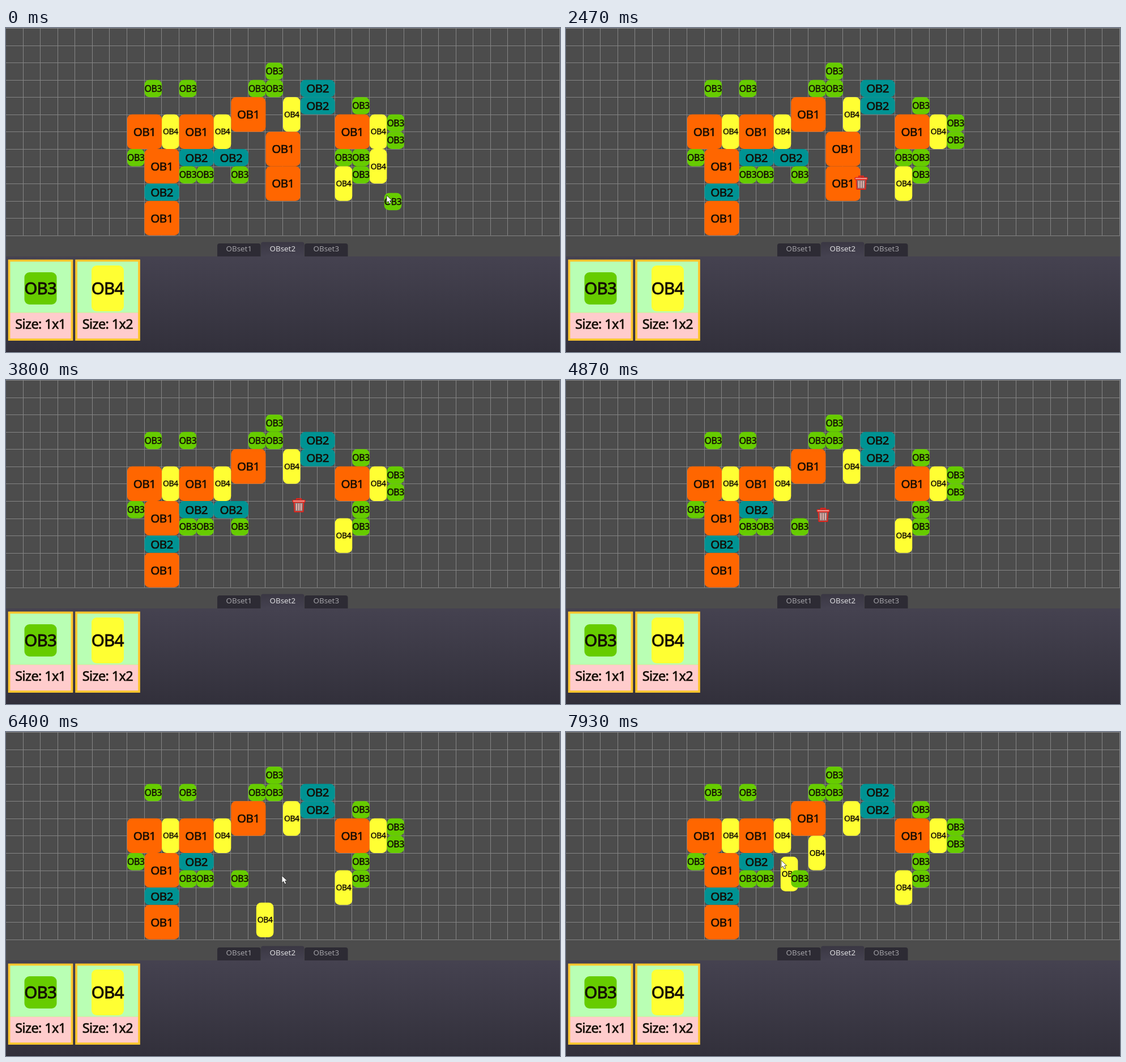
An HTML page that plays this animation: 978x573 px, repeating every 8 s.

```html
<!DOCTYPE html>
<html lang="en">
<head>
<meta charset="utf-8">
<title>Grid object editor</title>
<style>
  html, body { margin: 0; width: 100%; height: 100%; overflow: hidden; background: #4c4c4c; }
  svg { display: block; width: 978px; height: 573px; }
  text { font-family: "Noto Sans", "Open Sans", sans-serif; text-anchor: middle; fill: #140d05; }
  .label { stroke: #140d05; stroke-width: .03em; letter-spacing: -.025em; }
  .tab { font-size: 13.4px; fill: #a2a1a6; }
  .tab.active { fill: #dddde0; }
</style>
</head>
<body>
<svg viewBox="0 0 978 573">
  <defs>
    <linearGradient id="panelFill" x1="0" y1="0" x2="0" y2="1">
      <stop offset="0" stop-color="#454250"/>
      <stop offset="1" stop-color="#32303b"/>
    </linearGradient>
    <linearGradient id="tabFill" x1="0" y1="0" x2="0" y2="1">
      <stop offset="0" stop-color="#3a3743"/>
      <stop offset="1" stop-color="#454250"/>
    </linearGradient>
  </defs>
  <rect width="978" height="573" fill="#4c4c4c"/>
  <path id="grid" stroke="#858585" fill="none"/>
  <g id="ghosts"></g>
  <g id="blocks"></g>
  <g id="panel">
    <rect y="404" width="978" height="169" fill="url(#panelFill)"/>
    <path d="M0 572.5H978" stroke="#27252e"/>
  </g>
  <g id="trash">
    <path d="M3.5 8H20.5L19.5 25H4.5Z" fill="#8c7775" stroke="#e3231b" stroke-width="2" stroke-linejoin="round"/>
    <path d="M8 10.5V22.5M12 10.5V22.5M16 10.5V22.5" stroke="#f0b9b3" stroke-width="1.8"/>
    <path d="M8 4.5V2H16V4.5" fill="none" stroke="#e3231b" stroke-width="1.8"/>
    <rect x="1.2" y="4.5" width="21.6" height="3.4" rx="1" fill="#eda49d" stroke="#e3231b" stroke-width="1.5"/>
  </g>
  <path id="arrow" d="M0 0V13L3 10.2L5.2 15L7.7 14L5.6 9.3H9.6Z" fill="#fff" stroke="#222" stroke-width=".8"/>
</svg>
<script>
const NS = "http://www.w3.org/2000/svg";
const COLS = 32, ROWS = 12, CELL = 978 / COLS;
const TICK = 200 / 3, LOOP = 8000;
const byId = id => document.getElementById(id);

const KINDS = {
  OB1: { w: 2, h: 2, fill: "#ff6600", size: 20.6 },
  OB2: { w: 2, h: 1, fill: "#009393", size: 20.6 },
  OB3: { w: 1, h: 1, fill: "#66cc00", size: 15.8 },
  OB4: { w: 1, h: 2, fill: "#ffff33", size: 13.9 }
};

// Each digit is the top left cell of a block of that kind.
const MAP_COL = 7, MAP_ROW = 2;
const MAP = [
  "........3",
  ".3.3...33.2",
  "......1..42..3",
  "1.41.4......1.43",
  "........1......3",
  "31.2.2......334",
  "...33.3.1...43",
  ".2",
  ".1"
];

// Pointer moves: first tick, last tick, end point. It rests in between.
const START = [672, 296];
const MOVES = [
  [0, 7, 694, 274], [15, 22, 660, 252], [27, 32, 606, 301], [32, 37, 509, 260],
  [39, 45, 592, 226], [47, 53, 505, 208], [58, 60, 455, 248], [60, 62, 394, 224],
  [64, 67, 416, 221], [71, 73, 442, 225], [73, 80, 484, 164], [81, 91, 205, 422],
  [94, 95, 341, 440], [95, 96, 487, 254], [98, 106, 458, 194], [106, 110, 436, 189],
  [114, 119, 380, 227]
];
const ERASE_FROM = 12, ERASE_TO = 94;
const ERASE_CLICKS = [26, 39, 47, 57, 70], PLACE_CLICK = 114;
const GHOST_LAG = 0.28, GHOST_SHIFT = -4.3;

function pointer(tick) {
  let [x, y] = START;
  for (const [from, to, endX, endY] of MOVES) {
    if (tick <= from) break;
    const part = Math.min(1, (tick - from) / (to - from));
    x += (endX - x) * part;
    y += (endY - y) * part;
  }
  return [x, y];
}

const ghostAt = tick => pointer(tick - GHOST_LAG).map(v => v + GHOST_SHIFT);

function add(parent, tag, attrs, text) {
  const node = document.createElementNS(NS, tag);
  for (const key in attrs) node.setAttribute(key, attrs[key]);
  if (text) node.textContent = text;
  parent.append(node);
  return node;
}

function label(parent, text, x, middle, size) {
  add(parent, "text", { x, y: middle + size * 0.36, "font-size": size, class: "label" }, text);
}

function drawBlock(parent, kind, x = 0, y = 0) {
  const { w, h, fill, size } = KINDS[kind];
  const node = add(parent, "g", { transform: `translate(${x} ${y})` });
  add(node, "rect", { width: w * CELL, height: h * CELL, rx: 8.5, fill });
  label(node, kind, w * CELL / 2, h * CELL / 2, size);
  return node;
}

const blocks = [];
function addBlock(kind, col, row, from = 0) {
  const node = drawBlock(byId("blocks"), kind, col * CELL, row * CELL);
  blocks.push({ node, kind, col, row, from, to: Infinity });
}

function blockUnder([x, y]) {
  const inside = (cell, first, count) => cell >= first && cell < first + count;
  return blocks.find(({ kind, col, row }) =>
    inside(x / CELL, col, KINDS[kind].w) && inside(y / CELL, row, KINDS[kind].h));
}

function drawGrid() {
  let d = "";
  for (let i = 0; i <= COLS; i++) d += `M${Math.round(i * CELL) - 0.5} 0V${ROWS * CELL}`;
  for (let i = 0; i <= ROWS; i++) d += `M0 ${Math.round(i * CELL) + 0.5}H978`;
  byId("grid").setAttribute("d", d);
}

function drawTab(x, text, active) {
  const panel = byId("panel"), top = active ? 378.5 : 381;
  add(panel, "path", {
    d: `M${x} 404V${top + 4}q0 -4 4 -4h68.5q4 0 4 4V404Z`,
    fill: active ? "url(#tabFill)" : "#2d2b34"
  });
  add(panel, "text", { x: x + 38.3, y: 395, class: active ? "tab active" : "tab" }, text);
}

function drawCard(x, kind, height, sizeText) {
  const panel = byId("panel"), mid = x + 57.3;
  const box = (inset, y, h, fill) =>
    add(panel, "rect", { x: x + inset, y, width: 114.6 - 2 * inset, height: h, fill });
  box(0, 409.5, 143.5, "#ffc62e");
  box(3.7, 413.2, 90.5, "#b9ffb4");
  box(3.7, 503.7, 45.5, "#ffcccc");
  add(panel, "rect", { x: mid - 28.5, y: 460.5 - height / 2, width: 57, height, rx: 9, fill: KINDS[kind].fill });
  label(panel, kind, mid - 0.3, 460.5, 29.6);
  label(panel, "Size: " + sizeText, mid, 523.8, 23.4);
}

drawGrid();
MAP.forEach((line, row) => [...line].forEach((mark, col) => {
  if (mark !== ".") addBlock("OB" + mark, MAP_COL + col, MAP_ROW + row);
}));
for (const tick of ERASE_CLICKS) blockUnder(pointer(tick)).to = tick;
addBlock("OB4", ...ghostAt(PLACE_CLICK).map(v => Math.round(v / CELL)), PLACE_CLICK);

drawTab(373, "OBset1", false);
drawTab(527, "OBset3", false);
drawTab(450, "OBset2", true);
drawCard(3.7, "OB3", 57, "1x1");
drawCard(122.2, "OB4", 81, "1x2");

const smallGhost = drawBlock(byId("ghosts"), "OB3");
const tallGhost = drawBlock(byId("ghosts"), "OB4");

function place(node, visible, [x, y]) {
  node.style.display = visible ? "" : "none";
  node.setAttribute("transform", `translate(${x} ${y})`);
}

function draw(time) {
  const tick = Math.floor((time % LOOP + 5) / TICK) % (LOOP / TICK);
  const erasing = tick >= ERASE_FROM && tick < ERASE_TO;
  const tip = pointer(tick), ghost = ghostAt(tick);
  for (const { node, from, to } of blocks) {
    node.style.display = tick >= from && tick < to ? "" : "none";
  }
  place(byId("trash"), erasing, tip);
  place(byId("arrow"), !erasing, tip);
  place(smallGhost, tick < ERASE_FROM, ghost);
  place(tallGhost, tick >= ERASE_TO, ghost);
}

const start = performance.now();
function loop() {
  draw(performance.now() - start);
  requestAnimationFrame(loop);
}
loop();
</script>
</body>
</html>
```
